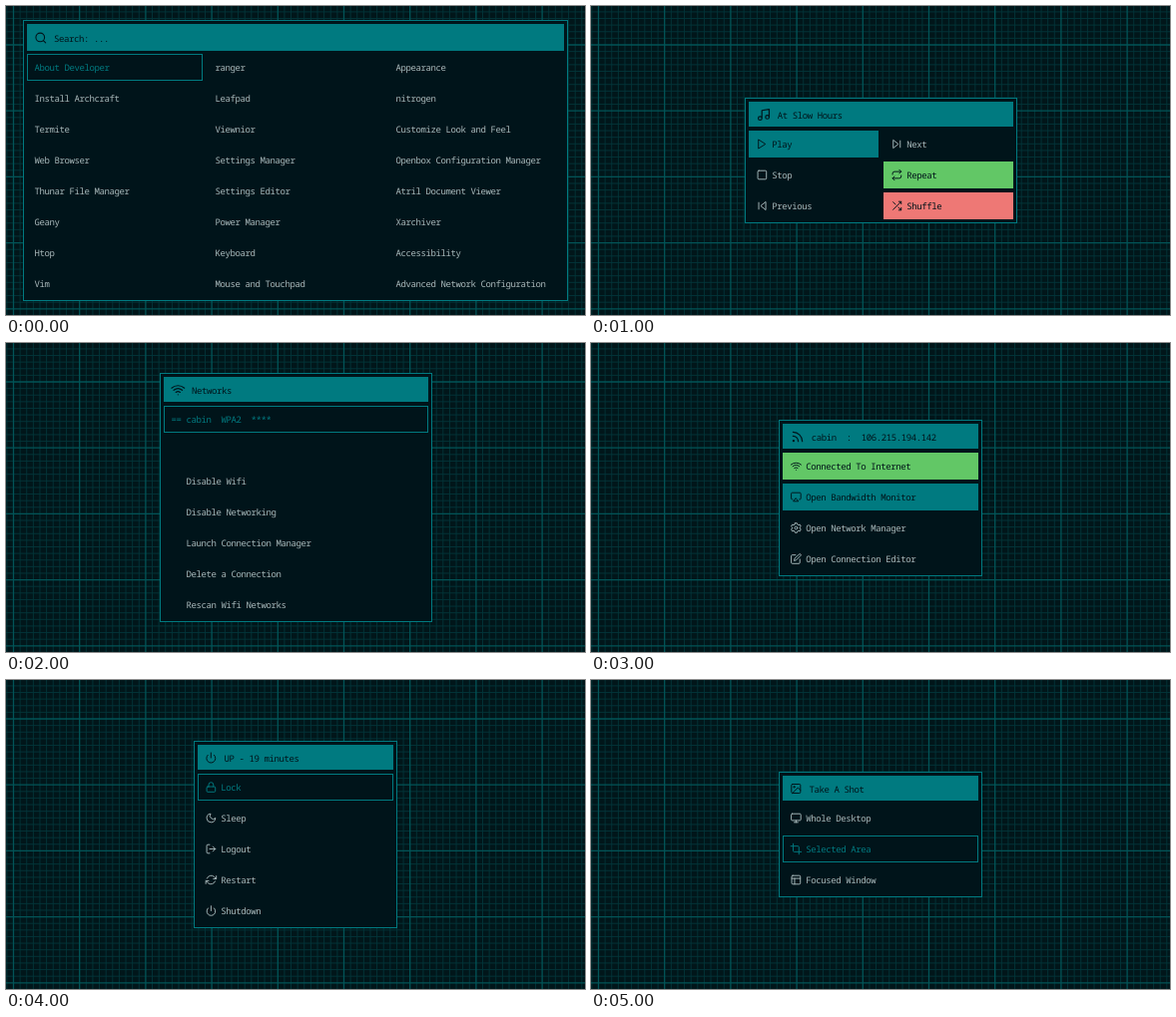
Recreate the animation shown at these times as an HTML page. Size 580 px wide and 310 px high, loop 6 s.

```html
<!DOCTYPE html>
<html lang="en">
<head>
<meta charset="utf-8">
<title>Desktop menus</title>
<style>
html, body { margin: 0; width: 100%; height: 100%; overflow: hidden; background: #01161a; }
svg { display: block; }
text {
  font: 9px "Noto Sans Mono", "DejaVu Sans Mono", monospace;
  letter-spacing: -0.4px;
  white-space: pre;
  text-rendering: geometricPrecision;
}
.icon { fill: none; stroke-width: 2; stroke-linecap: round; stroke-linejoin: round; }
</style>
</head>
<body>
<svg id="stage" width="580" height="310" viewBox="0 0 580 310"></svg>
<script>
const DARK = '#00141a', TEAL = '#007a80', GREEN = '#62c766', RED = '#ee7875', LIGHT = '#a9b8ba';
const SCENE_MS = 1000, ROW_PITCH = 31, ROW_HEIGHT = 27;

// Line icons on a 24 unit square.
const icons = {
  search: 'M19 11a8 8 0 1 1-16 0a8 8 0 1 1 16 0M21 21l-4.3-4.3',
  music: 'M9 18V5l12-2v13M9 18a3 3 0 1 1-6 0a3 3 0 1 1 6 0M21 16a3 3 0 1 1-6 0a3 3 0 1 1 6 0',
  play: 'M5 3l14 9l-14 9z',
  stop: 'M5 3h14a2 2 0 0 1 2 2v14a2 2 0 0 1-2 2H5a2 2 0 0 1-2-2V5a2 2 0 0 1 2-2z',
  previous: 'M19 20L9 12l10-8zM5 19V5',
  next: 'M5 4l10 8l-10 8zM19 5v14',
  repeat: 'M17 1l4 4l-4 4M3 11V9a4 4 0 0 1 4-4h14M7 23l-4-4l4-4M21 13v2a4 4 0 0 1-4 4H3',
  shuffle: 'M16 3h5v5M4 20L21 3M21 16v5h-5M15 15l6 6M4 4l5 5',
  wifi: 'M5 12.5a11 11 0 0 1 14 0M1.4 9a16 16 0 0 1 21.2 0M8.5 16.1a6 6 0 0 1 7 0M12 20h.01',
  rss: 'M4 11a9 9 0 0 1 9 9M4 4a16 16 0 0 1 16 16M6 19a1 1 0 1 1-2 0a1 1 0 1 1 2 0',
  monitor: 'M4 3h16a2 2 0 0 1 2 2v10a2 2 0 0 1-2 2H4a2 2 0 0 1-2-2V5a2 2 0 0 1 2-2zM8 21h8M12 17v4',
  cast: 'M5 17H4a2 2 0 0 1-2-2V5a2 2 0 0 1 2-2h16a2 2 0 0 1 2 2v10a2 2 0 0 1-2 2h-1M12 15l5 6H7z',
  gear: 'M15 12a3 3 0 1 1-6 0a3 3 0 1 1 6 0M10 2h4l1 3l2 1l3-1l2 4l-2 2v2l2 2l-2 4l-3-1l-2 1l-1 3h-4l-1-3l-2-1l-3 1l-2-4l2-2v-2l-2-2l2-4l3 1l2-1z',
  edit: 'M11 4H4a2 2 0 0 0-2 2v14a2 2 0 0 0 2 2h14a2 2 0 0 0 2-2v-7M18.5 2.5a2 2 0 0 1 3 3L12 15l-4 1l1-4z',
  power: 'M18.4 6.6a9 9 0 1 1-12.7 0M12 2v10',
  lock: 'M5 11h14a2 2 0 0 1 2 2v7a2 2 0 0 1-2 2H5a2 2 0 0 1-2-2v-7a2 2 0 0 1 2-2zM7 11V7a5 5 0 0 1 10 0v4',
  moon: 'M21 12.8A9 9 0 1 1 11.2 3a7 7 0 0 0 9.8 9.8z',
  logout: 'M9 21H5a2 2 0 0 1-2-2V5a2 2 0 0 1 2-2h4M16 17l5-5l-5-5M21 12H9',
  restart: 'M23 4v6h-6M1 20v-6h6M3.5 9a9 9 0 0 1 14.9-3.4L23 10M1 14l4.6 4.4A9 9 0 0 0 20.5 15',
  image: 'M5 3h14a2 2 0 0 1 2 2v14a2 2 0 0 1-2 2H5a2 2 0 0 1-2-2V5a2 2 0 0 1 2-2zM10 8.5a1.5 1.5 0 1 1-3 0a1.5 1.5 0 1 1 3 0M21 15l-5-5L5 21',
  crop: 'M6.1 1L6 16a2 2 0 0 0 2 2h15M1 6.1L16 6a2 2 0 0 1 2 2v15',
  layout: 'M5 3h14a2 2 0 0 1 2 2v14a2 2 0 0 1-2 2H5a2 2 0 0 1-2-2V5a2 2 0 0 1 2-2zM3 9h18M9 21V9'
};

// box: panel edges; header: icon, icon size, label, label x; columns: lists of [label, icon, style]
const scenes = [
  {
    box: [17, 14, 563, 296], header: ['search', 13, 'Search: ...', 48], headerHeight: 27, firstRow: 48,
    columnPitch: 181, cellWidth: 176, pad: 7.6,
    columns: [
      [['About Developer', '', 'outline'], ['Install Archcraft'], ['Termite'], ['Web Browser'],
       ['Thunar File Manager'], ['Geany'], ['Htop'], ['Vim']],
      [['ranger'], ['Leafpad'], ['Viewnior'], ['Settings Manager'],
       ['Settings Editor'], ['Power Manager'], ['Keyboard'], ['Mouse and Touchpad']],
      [['Appearance'], ['nitrogen'], ['Customize Look and Feel'], ['Openbox Configuration Manager'],
       ['Atril Document Viewer'], ['Xarchiver'], ['Accessibility'], ['Advanced Network Configuration']]
    ]
  },
  {
    box: [154, 92, 427, 218], header: ['music', 14.5, 'At Slow Hours', 186.7],
    columnPitch: 135, cellWidth: 130,
    columns: [
      [['Play', 'play', TEAL], ['Stop', 'stop'], ['Previous', 'previous']],
      [['Next', 'next'], ['Repeat', 'repeat', GREEN], ['Shuffle', 'shuffle', RED]]
    ]
  },
  {
    box: [154, 30, 427, 280], header: ['wifi', 14.5, 'Networks', 186], cellWidth: 265, pad: 7.5,
    columns: [[['== cabin  WPA2  ****', '', 'outline'], [''], ['   Disable Wifi'], ['   Disable Networking'],
      ['   Launch Connection Manager'], ['   Delete a Connection'], ['   Rescan Wifi Networks']]]
  },
  {
    box: [188, 77, 392, 234], header: ['rss', 14, 'cabin  :  106.215.194.142', 220.7], cellWidth: 196,
    columns: [[['Connected To Internet', 'wifi', GREEN], ['Open Bandwidth Monitor', 'cast', TEAL],
      ['Open Network Manager', 'gear'], ['Open Connection Editor', 'edit']]]
  },
  {
    box: [188, 61, 392, 249], header: ['power', 12, 'UP - 19 minutes', 218.5], cellWidth: 196,
    columns: [[['Lock', 'lock', 'outline'], ['Sleep', 'moon'], ['Logout', 'logout'],
      ['Restart', 'restart'], ['Shutdown', 'power']]]
  },
  {
    box: [188, 92, 392, 218], header: ['image', 12, 'Take A Shot', 218.5], cellWidth: 196,
    columns: [[['Whole Desktop', 'monitor'], ['Selected Area', 'crop', 'outline'], ['Focused Window', 'layout']]]
  }
];

const fillRect = (x, y, w, h, color) => `<rect x="${x}" y="${y}" width="${w}" height="${h}" fill="${color}"/>`;
const outlineRect = (x, y, w, h) =>
  `<rect x="${x + .5}" y="${y + .5}" width="${w - 1}" height="${h - 1}" fill="${DARK}" stroke="${TEAL}"/>`;
const label = (x, y, content, color) => `<text x="${x}" y="${y}" fill="${color}">${content}</text>`;
const icon = (name, cx, cy, size, color) =>
  `<path class="icon" stroke="${color}" d="${icons[name]}"
    transform="translate(${cx - size / 2} ${cy - size / 2}) scale(${size / 24})"/>`;

function grid() {
  const step = 6.62;
  let minor = '', major = '';
  for (let i = -6; i < 90; i++) {
    const x = 7.5 + i * step, y = 39 + i * step;
    const lines = `M${x} 0V310M0 ${y}H580`;
    if (i % 10) minor += lines; else major += lines;
  }
  return `<path d="${minor}" stroke="#04363a" stroke-width=".9"/>
    <path d="${major}" stroke="#025457" stroke-width="1.3"/>`;
}

function cell(x, y, width, pad, [content, iconName, style]) {
  const outlined = style === 'outline';
  const color = outlined ? TEAL : style ? DARK : LIGHT;
  let out = '';
  if (outlined) out += outlineRect(x, y, width, ROW_HEIGHT);
  else if (style) out += fillRect(x, y, width, ROW_HEIGHT, style);
  if (iconName) out += icon(iconName, x + 13.4, y + 13.5, 11.5, color);
  return out + label(x + pad, y + 17.4, content, color);
}

function panel({ box: [left, top, right, bottom], header, headerHeight = 25, firstRow = top + 33,
                 columnPitch = 0, cellWidth, pad = 23.2, columns }) {
  const [iconName, iconSize, title, titleX] = header;
  const x = left + 4, y = top + 4, middle = y + headerHeight / 2;
  const iconX = titleX - (iconSize > 13 ? 13.7 : 13.2);
  return outlineRect(left, top, right - left, bottom - top)
    + fillRect(x, y, right - left - 8, headerHeight, TEAL)
    + icon(iconName, iconX, middle + .5, iconSize, DARK)
    + label(titleX, middle + 4.2, title, DARK)
    + columns.map((rows, c) => rows.map((row, r) =>
        cell(x + c * columnPitch, firstRow + r * ROW_PITCH, cellWidth, pad, row)).join('')).join('');
}

const stage = document.getElementById('stage');
stage.innerHTML = grid() + scenes.map(scene => `<g class="scene">${panel(scene)}</g>`).join('');
const groups = stage.querySelectorAll('.scene');

function draw() {
  const current = Math.floor(performance.now() / SCENE_MS) % scenes.length;
  groups.forEach((group, i) => group.style.display = i === current ? '' : 'none');
  requestAnimationFrame(draw);
}
draw();
</script>
</body>
</html>
```
